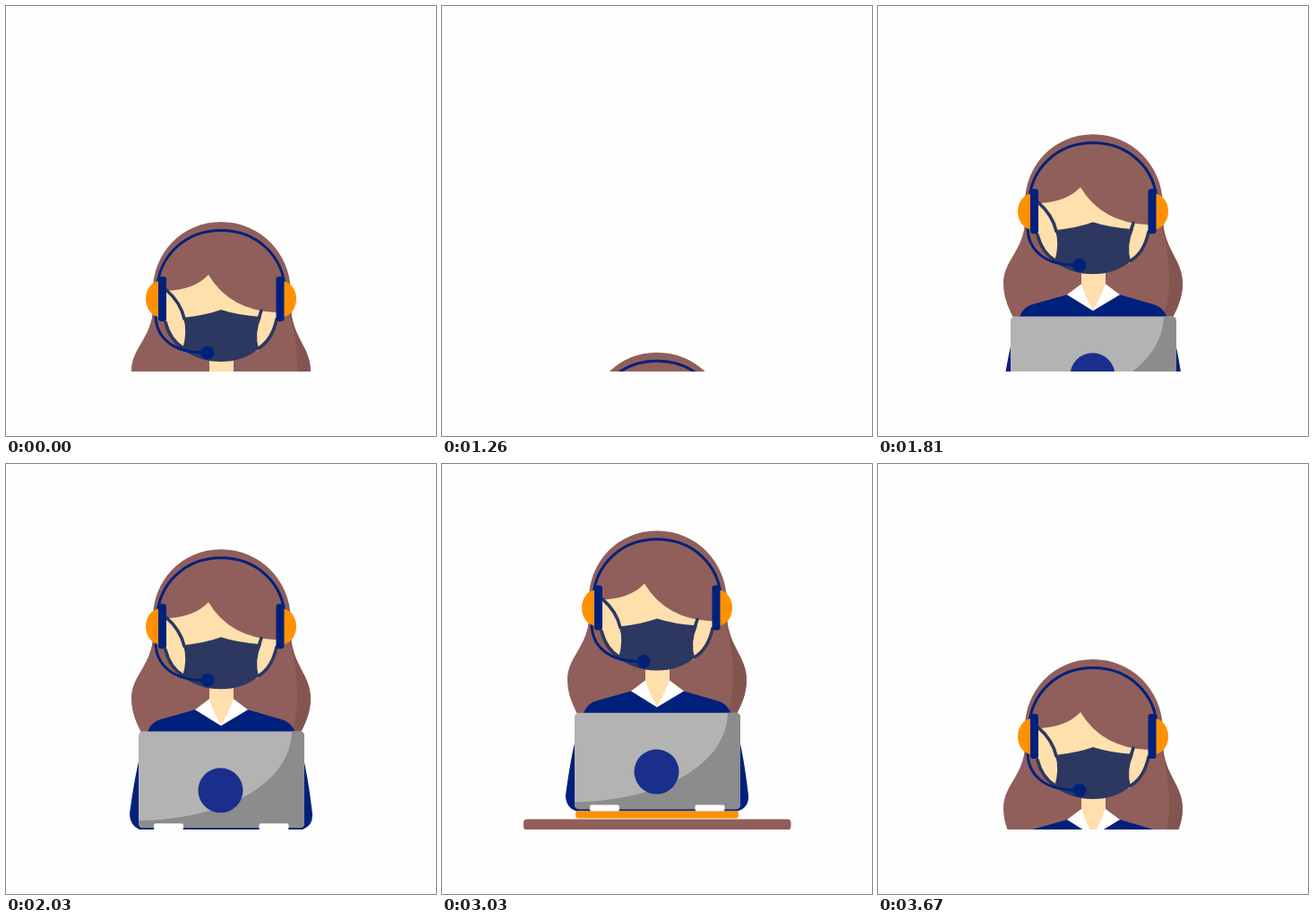
Write an HTML page that moves like this. It is 480 px wide and 480 px high and loops after 3730 ms.

```html
<!DOCTYPE html>
<html lang="en">
<head>
<meta charset="utf-8">
<title>Call agent</title>
<style>
  html, body { margin: 0; width: 100%; height: 100%; overflow: hidden; background: #fefefe; }
  svg { display: block; width: 100vw; height: 100vh; }
  .hair { fill: #905f5b; }
  .shade { fill: #835551; }
  .skin { fill: #ffdfac; }
  .mask { fill: #2c3860; }
  .navy { fill: #00217b; }
  .orange { fill: #ff9100; }
  .white { fill: #fefefe; }
  .strap, .wire { fill: none; stroke: #2c3860; stroke-width: 3.6; stroke-linecap: round; }
  .wire { stroke: #00217b; stroke-width: 3; }
</style>
</head>
<body>
<svg viewBox="0 0 480 480">
  <defs>
    <clipPath id="floor"><rect width="480" height="408"/></clipPath>
    <clipPath id="lid"><rect x="148" y="278" width="185" height="108" rx="5"/></clipPath>
    <path id="locks" d="M240 75C196 75 164 110 164 152V172C163 204 140 216 140 241C140 258 146 270 154 285H326C334 270 340 258 340 241C340 216 320 204 318 172V152C317 110 284 75 240 75Z"/>
    <clipPath id="hairClip"><use href="#locks"/></clipPath>
  </defs>
  <g clip-path="url(#floor)">
    <g id="agent">
      <use href="#locks" class="hair"/>
      <path class="shade" clip-path="url(#hairClip)" d="M316 175Q325 205 325 238Q325 262 317 285H345V175Z"/>

      <path class="navy" d="M211 254L172 265Q160 268 156 285Q146 310 138 370Q138 384 150 388H330Q343 384 342 370Q335 310 325 285Q320 268 308 265L270 254L240 262Z"/>
      <path class="white" d="M227 242L211 254L240 272L270 254L254 242Z"/>
      <path class="skin" d="M227 222V242Q232 258 240 271Q248 258 254 242V222Z"/>

      <path class="skin" d="M178 152Q210 151 226 134Q250 174 302 176V183Q297 205 282 218Q240 240 199 218Q182 205 178 187Z"/>
      <path class="strap" d="M179 151Q195 165 199 183M178 187Q183 207 198 216M285 174L282 183M302 184Q297 207 282 216"/>
      <path class="mask" d="M198 182Q224 179 240 173Q258 179 285 181Q277 199 282 217Q264 231 240 231Q215 231 197 217Q203 198 198 182Z"/>

      <path class="wire" d="M168.5 152C170 112 201 84.500 240 84.500S310 112 311.500 152M167 178C167 206 188 221 222 221"/>
      <circle class="navy" cx="225" cy="221" r="7.500"/>
      <path class="orange" d="M172 141A16 20 0 0 0 172 181ZM308 141A16 20 0 0 1 308 181Z"/>
      <rect class="navy" x="170" y="136" width="9" height="50" rx="3"/>
      <rect class="navy" x="301.500" y="136" width="9" height="50" rx="3"/>

      <g clip-path="url(#lid)">
        <rect fill="#b3b3b3" x="148" y="278" width="185" height="108"/>
        <path fill="#8c8c8c" d="M319 278C318 336 246 376 148 378V386H333V278Z"/>
      </g>
      <circle fill="#1a2f8b" cx="239.500" cy="344" r="25"/>
      <rect class="orange" x="149" y="388" width="182" height="8" rx="3"/>
      <rect class="white" x="165" y="381" width="33" height="7" rx="2"/>
      <rect class="white" x="282.500" y="381" width="33" height="7" rx="2"/>
      <rect class="hair" x="91" y="397" width="298.500" height="12" rx="4"/>
    </g>
  </g>
</svg>
<script>
  const LOOP = 3730, RISE = 1170, SINK = 3030, STEPS = 22, TRAVEL = 337, REST = -2.5;
  // Runs of [steps, ms per step]
  const riseRuns = [[10, 40], [5, 60], [6, 80]];
  const sinkRuns = [[5, 80], [6, 60], [10, 40]];
  const agent = document.getElementById('agent');

  const ease = p => {
    p = Math.min(p, 1);
    return p * p * (3 - 2 * p);
  };

  function stepAt(ms, runs) {
    let n = 1;
    for (const [count, each] of runs) {
      if (ms < count * each) return n + Math.floor(ms / each);
      ms -= count * each;
      n += count;
    }
    return n;
  }

  function dropAt(t) {
    if (t >= RISE && t < SINK) {
      return 1 - ease((stepAt(t - RISE, riseRuns) + 0.5) / STEPS);
    }
    return ease(stepAt((t - SINK + LOOP) % LOOP, sinkRuns) / STEPS);
  }

  function draw() {
    const y = REST + TRAVEL * dropAt(performance.now() % LOOP);
    agent.setAttribute('transform', `translate(0 ${y.toFixed(2)})`);
    requestAnimationFrame(draw);
  }
  draw();
</script>
</body>
</html>
```
